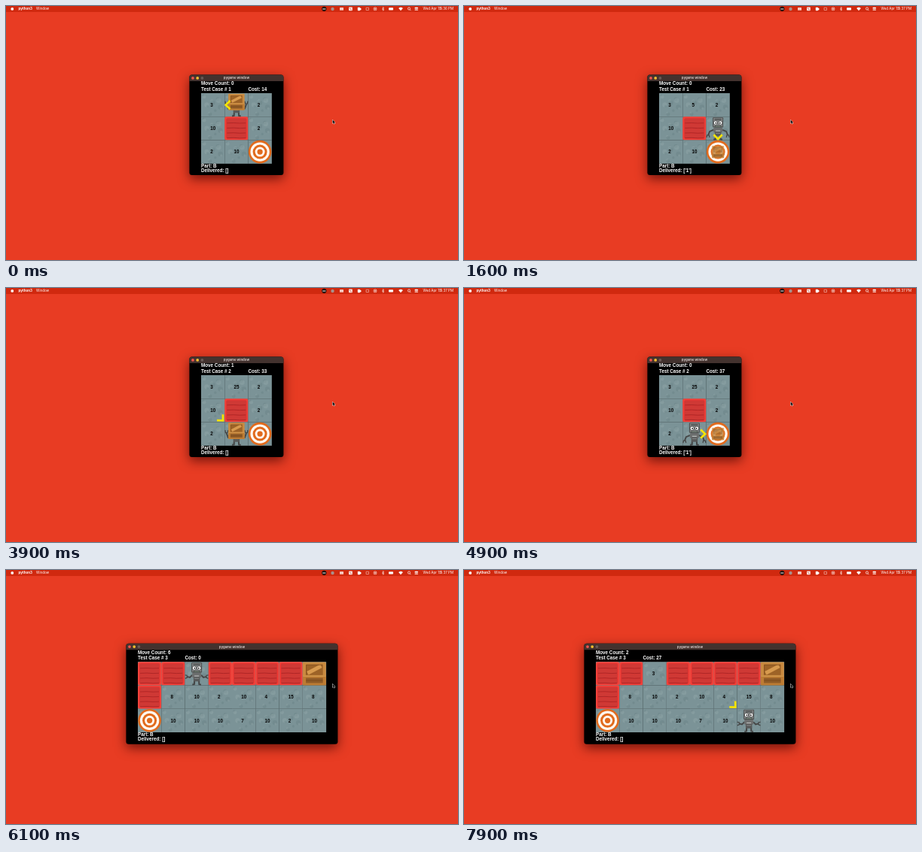
An HTML page with a canvas that plays this animation: 600x338 px, repeating every 8 s.

```html
<!DOCTYPE html>
<html lang="en">
<head>
<meta charset="utf-8">
<title>Warehouse robot</title>
<style>
  html, body { margin: 0; width: 100%; height: 100%; overflow: hidden; background: #e83c23; }
  canvas { display: block; width: 600px; height: 338px; }
</style>
</head>
<body>
<canvas id="stage"></canvas>
<script>
const LOOP = 8000, CELL = 31.25;
const canvas = document.getElementById('stage');
const ctx = canvas.getContext('2d');
const ratio = window.devicePixelRatio || 1;
canvas.width = 600 * ratio;
canvas.height = 338 * ratio;
ctx.scale(ratio, ratio);

// '#' wall, '@' drop-off; x, y: top left of the grid
const small = { x: 259, y: 116, w: 125, h: 133.5 };
const levels = {
  1: { ...small, rows: ['3 5 2', '10 # 2', '2 10 @'], box: [0, 0] },
  2: { ...small, rows: ['3 25 2', '10 # 2', '2 10 @'], box: [0, 0] },
  3: { x: 175, y: 122.2, w: 281, h: 134, box: [7, 0],
       rows: ['# # 3 # # # # 8', '# 8 10 2 10 4 15 8', '@ 10 10 10 7 10 2 10'] }
};

// arrow: column, row, dx, dy of the latest action
const steps = [
  { t: 0,    level: 1, at: [1, 0], moves: 0, cost: 14, box: 'held', arrow: [1, 0, -1, 0] },
  { t: 100,  level: 1, at: [2, 1], moves: 1, cost: 19, box: 'held', arrow: [1, 0, 1, 1] },
  { t: 500,  level: 1, at: [2, 1], moves: 0, cost: 23, box: 'done', arrow: [2, 1, 0, 1] },
  { t: 1800, level: 2, at: [1, 2], moves: 2, cost: 0,  box: 'floor' },
  { t: 2700, level: 2, at: [0, 1], moves: 1, cost: 13, box: 'floor', arrow: [1, 2, -1, -1] },
  { t: 3200, level: 2, at: [0, 1], moves: 0, cost: 20, box: 'held', arrow: [0, 1, 0, -1] },
  { t: 3600, level: 2, at: [1, 2], moves: 1, cost: 33, box: 'held', arrow: [0, 1, 1, 1] },
  { t: 4000, level: 2, at: [1, 2], moves: 0, cost: 37, box: 'done', arrow: [1, 2, 1, 0] },
  { t: 5200, level: 3, at: [2, 0], moves: 6, cost: 0,  box: 'floor' },
  { t: 6200, level: 3, at: [3, 1], moves: 5, cost: 5,  box: 'floor', arrow: [2, 0, 1, 1] },
  { t: 6700, level: 3, at: [4, 2], moves: 4, cost: 15, box: 'floor', arrow: [3, 1, 1, 1] },
  { t: 7100, level: 3, at: [5, 1], moves: 3, cost: 22, box: 'floor', arrow: [4, 2, 1, -1] },
  { t: 7600, level: 3, at: [6, 2], moves: 2, cost: 27, box: 'floor', arrow: [5, 1, 1, 1] }
];

function rect(x, y, w, h, color, radius = 0) {
  ctx.fillStyle = color;
  ctx.beginPath();
  ctx.roundRect(x, y, w, h, radius);
  ctx.fill();
}
function disc(x, y, r, color) {
  ctx.fillStyle = color;
  ctx.beginPath();
  ctx.arc(x, y, r, 0, 7);
  ctx.fill();
}
function line(points, color, width) {
  ctx.strokeStyle = color;
  ctx.lineWidth = width;
  ctx.beginPath();
  points.forEach(([x, y], i) => i ? ctx.lineTo(x, y) : ctx.moveTo(x, y));
  ctx.stroke();
}
function text(str, x, y, color, font, align = 'left') {
  ctx.fillStyle = color;
  ctx.font = font;
  ctx.textAlign = align;
  ctx.fillText(str, x, y);
}
function placed(x, y, scale, draw) {
  ctx.save();
  ctx.translate(x, y);
  ctx.scale(scale, scale);
  draw();
  ctx.restore();
}

const GAME = 'bold 6.3px "Liberation Sans", sans-serif';
const UI = '4.5px Inter, sans-serif';

function drawMenuBar(clock) {
  rect(0, 0, 600, 8, '#d0290f');
  disc(8.3, 3.9, 1.9, '#fff');
  text('python3', 16.5, 5.4, '#fff', 'bold ' + UI);
  text('Window', 40, 5.4, '#fff', UI);
  disc(422.3, 3.8, 3.1, '#201210');
  text('co', 422.3, 5, '#fff', 'bold 3.6px Inter, sans-serif', 'center');
  disc(433.5, 4, 2.2, '#a9908c');
  rect(443, 2, 5, 3.8, '#f6c9c0', .6);
  rect(455, 1.5, 4.8, 4.8, '#f9e4e0', .8);
  line([[456, 3], [458.6, 5]], '#c8452f', .7);
  rect(466.8, 1.7, 3.2, 4.5, '#fff', .8);
  disc(470, 4, 1.6, '#fff');
  line([[478, 2.3], [481.5, 2.3], [481.5, 5.5], [478, 5.5], [478, 2.3]], '#f0b0a5', .7);
  disc(490, 3.9, 2.4, '#f4c3ba');
  disc(490, 3.9, 1.6, '#d0290f');
  disc(490, 3.9, .8, '#fff');
  line([[499, 2.7], [502, 5], [500.5, 6.2], [500.5, 1.5], [502, 2.7], [499, 5]], '#f6d3cc', .6);
  rect(508, 2.2, 6, 3.4, '#fff', .8);
  ctx.fillStyle = '#fff';
  ctx.beginPath();
  ctx.moveTo(524, 6.3);
  ctx.arc(524, 6.3, 4.3, -2.3, -.84);
  ctx.fill();
  ctx.strokeStyle = '#fff';
  ctx.lineWidth = .7;
  ctx.beginPath();
  ctx.arc(535, 3.5, 1.6, 0, 7);
  ctx.stroke();
  line([[536.1, 4.7], [537.4, 6.1]], '#fff', .7);
  rect(542.5, 1.8, 4.5, 1.8, '#fff', .9);
  rect(542.5, 4.3, 4.5, 1.8, '#f3b8ad', .9);
  text('Wed Apr 19', 553.5, 5.4, '#fff', UI);
  text(clock, 594, 5.4, '#fff', UI, 'right');
}

function drawWindow({ x, y, w, h }) {
  const left = x - 15.6, top = y - 24.5;
  ctx.save();
  ctx.shadowColor = 'rgba(50,0,0,.65)';
  ctx.shadowBlur = 15 * ratio;
  ctx.shadowOffsetY = 5 * ratio;
  rect(left, top, w, h, '#000', 3.5);
  ctx.restore();
  rect(left, top, w, 8.6, '#43322e', [3.5, 3.5, 0, 0]);
  ['#f2554d', '#f5bd30', '#6a5a56'].forEach((color, i) => disc(left + 4.6 + i * 6.2, top + 4.4, 1.9, color));
  text('pygame window', left + w / 2, top + 5.9, '#cfc4c1', 'bold 4.3px Inter, sans-serif', 'center');
}

function drawFloor() {
  rect(0, 0, CELL + .1, CELL + .1, '#7b9397');
  for (let i = 0; i < 13; i++) {
    const px = 3 + (i * 11.3) % 26, py = 3 + (i * 7.7) % 26;
    disc(px, py, 1.6 + i % 3 * .8, i % 2 ? 'rgba(150,172,174,.38)' : 'rgba(96,121,126,.3)');
  }
}
function drawWall() {
  rect(0, 0, CELL, CELL, '#e44d43', 2);
  rect(.5, .5, 30.2, 30.2, '#f43f38', 3);
  rect(2, 2, 27.2, 27.2, '#d83532', 2);
  for (let i = 0; i < 4; i++) {
    const y = 3 + i * 6.6;
    rect(3, y, 25.2, 5.2, '#cf3935', .8);
    line([[3, y + 5.6], [12, y + 5.3], [20, y + 5.8], [28, y + 5.5]], '#a82626', .9);
  }
}
function drawTarget() {
  [15.3, 12.7, 9.5, 6.5, 3.6].forEach((r, i) => disc(15.6, 15.6, r, i % 2 ? '#fff8f0' : '#e16a1c'));
}

// Crate and robot are drawn around the centre of a cell.
function drawCrate() {
  rect(-15.4, -15.4, 30.8, 30.8, '#c98a3f', 1);
  rect(-15.4, 3, 30.8, 12.4, '#bd7c33', 1);
  rect(-11.3, -12, 22.6, 14, '#9d6327');
  line([[-9, -.5], [9, -10]], '#d79a4e', 5);
  line([[-10.8, 1.6], [-10.8, -11.6], [10.8, -11.6]], '#84501e', .8);
  line([[-15, 3.4], [15, 3.4]], '#dba358', .9);
  rect(-11.3, 5.8, 22.6, 6.8, '#8f5b27');
  line([[-11, 9.2], [11, 9.2]], '#774719', .8);
}
function drawRobot(pose) {
  const dark = '#454646', steel = '#6c6e6e';
  const arm = pose === 'up' ? [[6, 5], [11, 5], [13.2, -1]] :
              pose === 'down' ? [[6, 2], [11, 4], [13, 9]] : [[6, 2], [9, 5], [13, 4]];
  const hand = pose === 'up' ? [[11, -5], [12, -1.5], [14.4, -1.5], [15, -5]] :
               pose === 'down' ? [[11.2, 12], [11.8, 9], [14.4, 9], [15, 12]] :
               [[15.5, 2], [13, 2.4], [12.6, 5.2], [15.3, 6.5]];
  for (const side of [-1, 1]) {
    const flip = points => points.map(([x, y]) => [x * side, y]);
    line(flip(arm), dark, 1.9);
    line(flip(hand), dark, 1.3);
    line(flip([[3, 9], [3.2, 14.2], [5.8, 14.8]]), dark, 2);
  }
  rect(-6, -1.5, 12, 7, steel, 1.5);
  rect(-4.2, 4.5, 8.4, 6, '#575959', 1);
  rect(-3, 2.6, 6, 1.2, '#b9bcbb');
  line([[-3, 6.5], [3, 6.5]], '#949696', .8);
  rect(-7, -14.6, 14, 13.2, '#4c4e4e', 1);
  rect(-6, -13.8, 12, 11.4, '#838686', .6);
  rect(-4.6, -13.2, 9.2, 2.6, '#5b5e5e');
  for (const x of [-3.2, 3.2]) {
    disc(x, -7.4, 2.7, '#393a3a');
    disc(x, -7.4, 2.2, '#fff');
    disc(x * .85, -7.2, .9, '#111');
  }
  rect(-4.3, -3.6, 8.6, 1.9, '#2d332f');
  line([[-3.7, -2.6], [3.7, -2.6]], '#a9bca9', .7);
}
function drawArrow(dx, dy) {
  ctx.rotate(Math.atan2(dy, dx));
  const tip = dx && dy ? 19 : 14.2;
  line([[tip - 5.8, -5.6], [tip, 0], [tip - 5.8, 5.6]], '#f7e400', 2.7);
}

function drawCursor() {
  placed(433.6, 151.6, 1, () => {
    ctx.beginPath();
    [[0, 0], [0, 4.6], [1.1, 3.7], [1.9, 5.4], [2.7, 5], [2, 3.4], [3.4, 3.3]].forEach(p => ctx.lineTo(...p));
    ctx.closePath();
    ctx.lineWidth = .9;
    ctx.strokeStyle = '#fff';
    ctx.stroke();
    ctx.fillStyle = '#000';
    ctx.fill();
  });
}

function drawScene(step, clock) {
  const level = levels[step.level];
  const { x, y, rows, box } = level;
  const centre = (c, r) => [x + (c + .5) * CELL, y + (r + .5) * CELL];
  let target;

  rect(0, 0, 600, 338, '#e83c23');
  drawMenuBar(clock);
  drawWindow(level);

  rows.forEach((row, r) => row.split(' ').forEach((tile, c) => {
    const left = x + c * CELL, top = y + r * CELL;
    placed(left, top, 1, drawFloor);
    if (tile === '#') placed(left, top, 1, drawWall);
    else if (tile === '@') {
      target = [c, r];
      placed(left, top, 1, drawTarget);
    } else if (c !== step.at[0] || r !== step.at[1]) {
      text(tile, left + 12.2, top + 17.8, '#080808', GAME);
    }
  }));

  if (step.box === 'floor') placed(...centre(...box), 1, drawCrate);
  if (step.box === 'done') {
    ctx.globalAlpha = .62;
    placed(...centre(...target), .52, drawCrate);
    ctx.globalAlpha = 1;
  }

  const [rx, ry] = centre(...step.at);
  const pose = step.box === 'held' ? 'up' : step.box === 'done' ? 'down' : 'out';
  placed(rx, ry, 1, () => drawRobot(pose));
  if (step.box === 'held') placed(rx, ry - 4, .7, drawCrate);
  if (step.arrow) {
    const [c, r, dx, dy] = step.arrow;
    placed(...centre(c, r), 1, () => drawArrow(dx, dy));
  }

  const label = (str, dx, dy) => text(str, x + dx, y + dy, '#fff', GAME);
  label('Move Count: ' + step.moves, 0, -10.7);
  label('Test Case # ' + step.level, 0, -3);
  label('Cost: ' + step.cost, 62.4, -3);
  label('Part: B', 0, 98.8);
  label(step.box === 'done' ? "Delivered: ['1']" : 'Delivered: []', 0, 105);
  drawCursor();
}

let shown = '';
const start = performance.now();
function tick() {
  const t = (performance.now() - start) % LOOP;
  const step = steps.findLast(s => s.t <= t);
  const clock = t < 700 ? '5:36 PM' : '5:37 PM';
  if (shown !== step.t + clock) {
    shown = step.t + clock;
    drawScene(step, clock);
  }
  requestAnimationFrame(tick);
}
tick();
</script>
</body>
</html>
```
